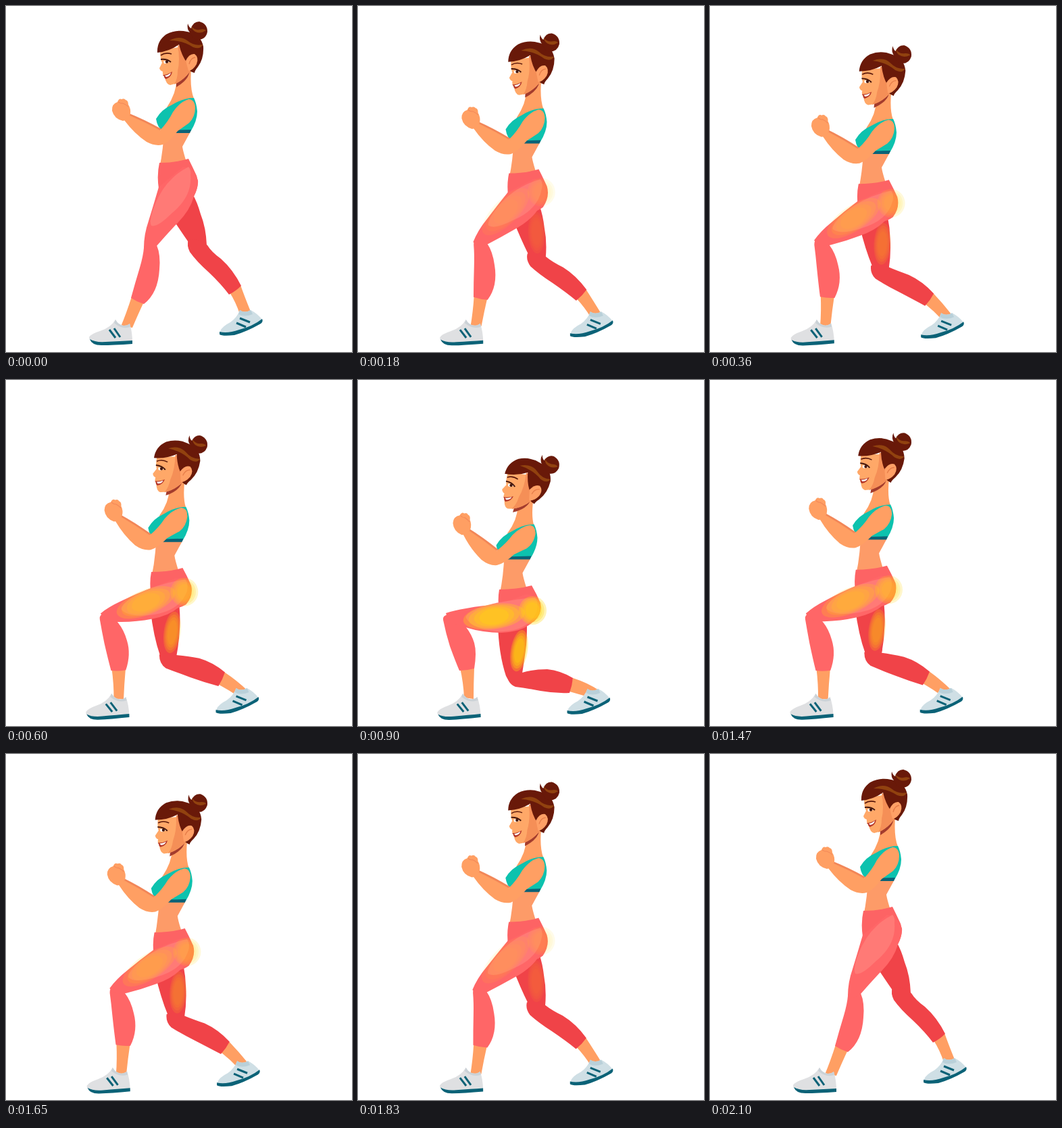
Animation of 512 by 512 pixels, one loop 2.25 s. Source, as an HTML page:

```html
<!DOCTYPE html>
<html lang="en">
<head>
<meta charset="utf-8">
<title>Split squat</title>
<style>
html, body { margin: 0; width: 100%; height: 100%; overflow: hidden; background: #fff; }
svg { display: block; width: 100vw; height: 100vh; }
</style>
</head>
<body>
<svg viewBox="0 0 512 512">
  <g id="backLeg"></g>
  <g id="backGlow"></g>
  <g id="backFoot">
    <path fill="#cfdfe5" d="M317 481Q320 474 332 468Q342 461 346 450Q353 455 362 450Q372 455 379 464Q362 480 338 486Q318 488 317 481Z"/>
    <path fill="#b9d0d9" d="M346 450Q353 455 362 450L365 456Q353 461 344 456Z"/>
    <path fill="#0b6277" d="M316 482Q328 485 345 479Q365 474 379 463Q381 467 377 470Q356 482 338 487Q320 489 316 486Z"/>
    <path stroke="#0b6277" stroke-width="3" d="M346 462L361 468M341 469L355 475"/>
  </g>
  <path id="belly" fill="#fd9b68" d="M234 180Q233 212 227 240L270 240Q262 216 261 208Q267 197 273 186Z"/>
  <g id="frontLeg"></g>
  <g id="thighGlow"></g>
  <g id="hipGlow"></g>
  <g id="frontFoot">
    <path fill="#dfe0e2" d="M123 490Q126 485 139 481Q155 476 162 464Q166 472 174 473Q180 473 183 470Q187 482 187 498Q159 501 137 500Q123 498 123 490Z"/>
    <path fill="#cbd2d7" d="M162 464Q166 472 174 473Q180 473 183 470L184 475Q171 479 160 469Z"/>
    <path fill="#0b6277" d="M124 493Q132 498 147 497Q169 496 187 495L187 500Q159 502 141 502Q127 502 124 493Z"/>
    <path stroke="#0b6277" stroke-width="3" d="M153 479L162 491M160 477L169 490"/>
  </g>
  <g id="neck"></g>
  <g id="torso">
    <path fill="#0dc2ae" d="M278 136Q262 136 246 146Q230 153 222 167Q224 180 232 185Q254 188 273 186Q283 170 283 156Q282 144 278 136Z"/>
    <path fill="#0b6277" d="M236 184L274 183L272 188L236 188Z"/>
  </g>
  <g id="arm">
    <path fill="#f28658" d="M180 158Q205 168 230 182L222 190Q200 178 180 166Z"/>
    <path fill="#ff9f63" d="M228 184Q240 171 247 157Q257 142 270 138Q279 138 280 150Q280 164 271 173Q264 178 254 185Q243 200 232 205Q221 208 208 201Q190 189 175 169L183 162Q206 172 228 184Z"/>
    <path fill="#ff9f63" d="M157 155Q156 145 165 142Q167 136 171 138Q175 136 177 139Q181 140 181 146Q185 152 184 160Q181 169 173 170Q160 167 157 155Z"/>
    <path fill="none" stroke="#f28658" d="M166 142Q170 145 173 144Q178 146 181 149"/>
  </g>
  <g id="head">
    <path fill="#a43c2d" d="M252 110Q264 106 272 95Q271 109 252 120Z"/>
    <path fill="#ffa868" d="M228 66Q228 78 231 84L227 92Q228 96 232 97Q231 102 235 106Q237 116 243 117Q254 115 263 107Q271 100 275 92L270 58Z"/>
    <path fill="#f58f57" d="M254 58Q258 80 254 96Q254 108 249 116Q256 113 263 107Q271 100 275 92L266 60Z"/>
    <path fill="#691909" d="M224 69Q223 52 237 42Q252 34 268 38Q288 41 292 60Q293 78 284 90Q279 96 279 99Q275 98 272 96Q280 90 281 84L268 84Q260 74 256 57Q242 67 224 69Z"/>
    <path fill="#691909" d="M273 40Q267 35 269 26Q271 32 274 33Q277 23 286 23Q298 26 298 38Q296 50 283 50Q276 49 273 40Z"/>
    <path fill="#91420f" d="M242 51Q257 43 268 51Q279 60 291 57Q288 65 277 61Q262 51 242 51Z"/>
    <path fill="#91420f" d="M274 30Q279 36 286 35Q293 33 296 36Q288 42 280 38Q276 36 274 30Z"/>
    <path fill="#ffa066" d="M266 81Q271 70 279 71Q286 76 282 86Q277 95 270 96Z"/>
    <path fill="none" stroke="#e57c49" stroke-width="1.3" d="M271 86Q273 77 280 76"/>
    <path fill="none" stroke="#5a180b" stroke-width="1.6" d="M229 73Q236 68 245 71"/>
    <path fill="#fff" d="M233 82Q238 79 242 82Q238 86 234 85Z"/>
    <circle cx="238" cy="82.5" r="2.2" fill="#45170d"/>
    <path fill="none" stroke="#45170d" stroke-width="2" d="M229 79Q238 78 244 83"/>
    <path fill="#b5382b" d="M232 102Q239 102 246 97Q245 105 237 108Q234 107 234 104Z"/>
    <path fill="#fff" d="M235 103Q240 102 244 99Q243 104 237 105Z"/>
  </g>
</svg>
<script>
const LOOP = 2250, STEP = 30;
const $ = id => document.getElementById(id);
const mix = (a, b, k) => a + (b - a) * k;
const mixPt = (a, b, k) => [mix(a[0], b[0], k), mix(a[1], b[1], k)];

function add(parent, tag, attrs) {
  const el = document.createElementNS('http://www.w3.org/2000/svg', tag);
  for (const k in attrs) el.setAttribute(k, attrs[k]);
  return parent.appendChild(el);
}

// A frame is an origin and an angle; limbs are drawn relative to one.
const frame = ([x, y], a = 0) => ({ x, y, a });
const aim = (from, to) => frame(from, Math.atan2(to[1] - from[1], to[0] - from[0]));
function toLocal(f, [x, y]) {
  const c = Math.cos(f.a), s = Math.sin(f.a), dx = x - f.x, dy = y - f.y;
  return [dx * c + dy * s, dy * c - dx * s];
}
function toStage(f, [x, y]) {
  const c = Math.cos(f.a), s = Math.sin(f.a);
  return [f.x + x * c - y * s, f.y + x * s + y * c];
}

// Two-bone solve: the knee bends towards the walking direction.
function knee(hip, ankle, thigh, shin) {
  const line = aim(hip, ankle);
  const d = Math.hypot(ankle[0] - hip[0], ankle[1] - hip[1]);
  const along = (thigh * thigh + d * d - shin * shin) / (2 * d);
  return toStage(line, [along, Math.sqrt(Math.max(0, thigh * thigh - along * along))]);
}

// depth: 0 standing, 1 lowest
function pose(depth) {
  const plant = depth * (1.8 - 0.8 * depth);
  const hip = mixPt([262, 255], [246, 337], depth);
  const frontAnkle = mixPt([180, 470], [165, 468], plant);
  const backAnkle = mixPt([356, 452], [347, 461], plant);
  const frontKnee = knee(hip, frontAnkle, 112, 119);
  const backKnee = knee(hip, backAnkle, 104.5, 120);
  return {
    plant,
    pelvis: frame(hip),
    chest: frame([-17.5 * depth, 77.5 * depth]),
    thigh: aim(hip, frontKnee),
    shin: aim(frontKnee, frontAnkle),
    backThigh: aim(hip, backKnee),
    backShin: aim(backKnee, backAnkle)
  };
}

const high = pose(0), low = pose(1);
const morphs = [];

// Shape given on the stage for both end poses, blended inside its bone's frame.
function morph(group, bone, fill, a, b) {
  const points = (d, f) => {
    const n = d.match(/\d+/g).map(Number), out = [];
    for (let i = 0; i < n.length; i += 2) out.push(toLocal(f, [n[i], n[i + 1]]));
    return out;
  };
  morphs.push({
    el: add($(group), 'path', { fill }), bone, shape: a,
    from: points(a, high[bone]), to: points(b, low[bone])
  });
}

const SKIN = '#ff9f63', PINK = '#ff6667', RED = '#f04348';

morph('backLeg', 'backShin', SKIN,
  'M331 424L347 413Q353 430 362 452L346 456Q340 438 331 424Z',
  'M313 461L318 441Q340 448 358 460L345 470Q330 466 313 461Z');
morph('backLeg', 'backThigh', RED,
  'M240 305Q258 332 269 348Q273 362 284 360Q296 362 297 354Q296 328 288 308Q283 290 276 278L250 270Z',
  'M207 360Q208 405 219 438Q226 452 236 446Q243 442 243 434Q246 415 249 392Q250 380 250 362L225 350Z');
morph('backLeg', 'backShin', RED,
  'M270 346Q267 354 272 364Q282 378 300 394Q318 411 330 427Q340 422 348 414Q336 390 318 374Q304 364 298 354Q285 342 270 346Z',
  'M219 434Q222 450 233 454Q250 456 270 460Q292 464 313 463Q317 452 318 441Q300 430 280 428Q260 428 243 433Q230 428 219 434Z');

morph('frontLeg', 'shin', SKIN,
  'M186 430L204 438Q196 455 187 476L170 474Q178 455 186 430Z',
  'M151 426L172 426Q171 450 171 472L157 470Q156 448 151 426Z');
morph('frontLeg', 'shin', PINK,
  'M210 350Q205 351 204 358Q203 370 198 387Q191 410 185 432Q194 438 204 441Q225 425 227 390Q229 368 223 354Q217 349 210 350Z',
  'M134 347Q125 348 126 355Q130 375 136 394Q144 416 150 430Q161 430 172 427Q176 403 172 389Q168 376 160 366Q150 350 134 347Z');
morph('frontLeg', 'pelvis', '#fd6364',
  'M227 232Q250 232 270 226Q276 238 282 251Q287 266 277 283Q262 296 240 290Q228 285 226 270Q223 250 227 232Z',
  'M209 310Q236 310 257 304Q264 316 270 330Q273 346 261 357Q240 368 222 355Q209 345 208 333Q207 322 209 310Z');
morph('frontLeg', 'thigh', PINK,
  'M226 268Q219 292 211 318Q204 338 204 358Q212 364 223 355Q236 340 250 325Q272 304 278 282Q285 268 284 258Q277 240 262 238Z',
  'M208 333Q185 333 160 338Q142 341 130 345Q134 362 159 366Q185 374 212 374Q245 373 261 356Q272 345 270 333Q262 315 245 318Z');
morph('frontLeg', 'thigh', '#ff7a76',
  'M270 238Q235 256 220 295Q211 318 215 325Q224 328 245 307Q276 282 273 250Q274 242 270 238Z',
  'M262 322Q215 326 185 335Q158 345 160 352Q168 368 205 372Q250 374 264 344Q268 328 262 322Z');

morph('neck', 'chest', SKIN,
  'M252 105Q254 126 238 150L262 162L278 137Q272 122 274 95Z',
  'M236 182Q238 204 221 227L245 239L260 214Q256 200 260 172Z');

// Stacked translucent ellipses make the stepped warm spot.
function glow(id, rx, ry, dx, dy) {
  for (let i = 0; i < 4; i++)
    add($(id), 'ellipse', { rx: rx - dx * i, ry: ry - dy * i, fill: '#ffd60a', 'fill-opacity': 0.3 });
}
glow('thighGlow', 46, 18.5, 8, 2.2);
glow('hipGlow', 20.5, 21, 3.3, 3);
glow('backGlow', 31, 12.5, 4.2, 1.9);

const set = (id, transform) => $(id).setAttribute('transform', transform);
function place(id, f, x, y, opacity) {
  const [px, py] = toStage(f, [x, y]);
  set(id, `translate(${px} ${py}) rotate(${f.a * 180 / Math.PI})`);
  $(id).setAttribute('opacity', opacity);
}

function draw(depth) {
  const now = pose(depth);
  for (const m of morphs) {
    let i = 0;
    m.el.setAttribute('d', m.shape.replace(/\d+ \d+/g, () => {
      const p = toStage(now[m.bone], mixPt(m.from[i], m.to[i], depth));
      i++;
      return p[0].toFixed(2) + ' ' + p[1].toFixed(2);
    }));
  }
  const heat = Math.pow(depth, 0.8);
  place('thighGlow', now.thigh, 53 - 7 * depth, 8 - 14.6 * depth, heat);
  place('hipGlow', now.pelvis, 12.5, 4, heat);
  place('backGlow', now.backThigh, 64, -3, depth);

  const shift = `translate(${now.chest.x} ${now.chest.y})`;
  set('belly', shift);
  set('torso', shift);
  set('arm', `${shift} rotate(${10 * depth} 276 150)`);
  set('head', `translate(${-13 * depth} ${85 * depth}) rotate(${17 * depth} 278 82)`);
  set('frontFoot', `translate(${-5.5 * now.plant} ${0.5 * now.plant}) rotate(${-2.5 * now.plant} 150 495)`);
  set('backFoot', `translate(${-6.5 * now.plant} ${7 * now.plant})`);
}

function depthAt(ms) {
  if (ms < 900) return ms / 900;
  if (ms < 1050) return 1;
  const t = Math.min(1, (ms - 1050) / 1050);
  return 1 - (t + t * t * (3 - 2 * t)) / 2;
}

const start = performance.now();
function tick() {
  const ms = (performance.now() - start) % LOOP;
  draw(depthAt(Math.floor(ms / STEP) * STEP));
  requestAnimationFrame(tick);
}
tick();
</script>
</body>
</html>
```
